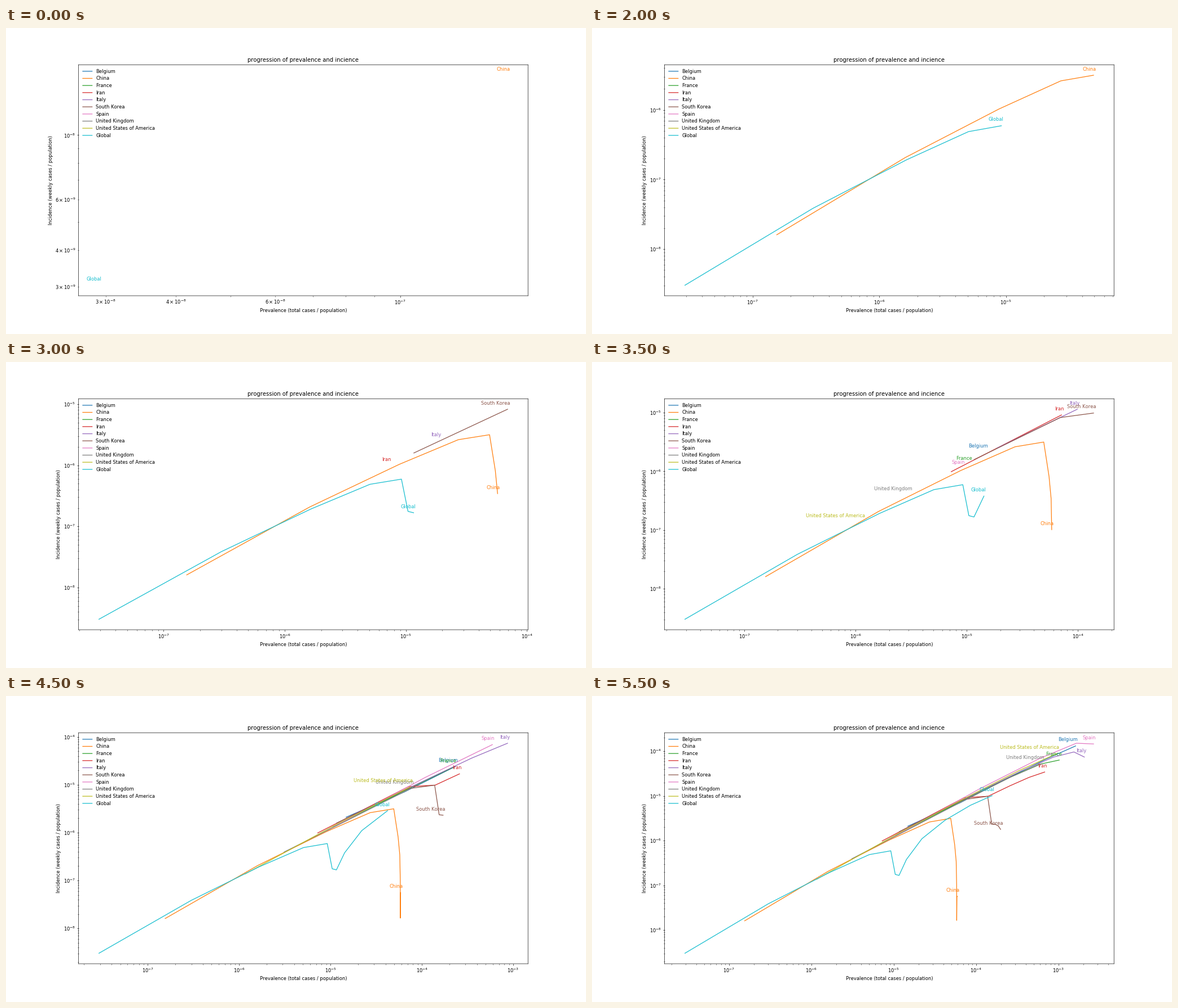
A matplotlib script that plays this animation: 1028 px wide and 544 px high, repeating every 10000 ms.

```python
import matplotlib.pyplot as plt
import numpy as np
from matplotlib.animation import FuncAnimation

W, H, DPI = 1028, 544, 60
WEEKS, STEP_MS, LOOP_MS = 12, 500, 10000

plt.rcParams["text.kerning_factor"] = 6
plt.rcParams["path.snap"] = False


def outbreak(before, *stages):
    """Weekly totals; each stage (weeks, end total, fade) eases the log total,
    its growth rate dying out one week after the stage is over."""
    logs = [np.log(before)]
    for weeks, end, fade in stages:
        left = 1 - np.arange(1, weeks + 1) / (weeks + 1)
        ease = (1 - left ** fade) / (1 - left[-1] ** fade)
        logs.extend(logs[-1] + (np.log(end) - logs[-1]) * ease)
    return np.exp(logs)


china = outbreak(59, (1, 216, 1), (4, 68600, 2.25), (4, 81050, 4.8), (3, 82700, 1))
elsewhere = outbreak(0.8, (6, 1770, 1), (6, 1.092e6, 1.5))

# name: (population in millions, weekly totals)
REGIONS = {
    "Belgium": (11.4, outbreak(1, (1, 169, 1), (4, 18430, 1.5))),
    "China": (1393, china),
    "France": (67, outbreak(100, (1, 716, 1), (4, 68600, 2))),
    "Iran": (81.8, outbreak(28, (1, 593, 1), (1, 5820, 1), (4, 55740, 1.4))),
    "Italy": (60.4, outbreak(79, (1, 1128, 1), (5, 124600, 2.35))),
    "South Korea": (51.6, outbreak(29, (1, 602, 1), (2, 7130, 2.9), (4, 10240, 1.5))),
    "Spain": (46.7, outbreak(66, (1, 430, 1), (4, 124700, 2.5))),
    "United Kingdom": (66.5, outbreak(23, (1, 206, 1), (4, 41900, 1.6))),
    "United States of America": (327, outbreak(66, (1, 380, 1), (4, 312200, 1.7))),
    "Global": (7500, china + elsewhere),
}


class Track:
    """One region's curve with a label riding on its newest point."""

    def __init__(self, ax, name, millions, totals):
        totals = totals / (millions * 1e6)
        self.x = totals[1:]
        self.y = np.diff(totals) / 7
        self.start = WEEKS - len(self.x)
        self.line, = ax.plot([], [], label=name)
        self.tag = ax.annotate(name, (1, 1), xytext=(5, 10), ha="right",
                               textcoords="offset points",
                               color=self.line.get_color())

    def show(self, week):
        n = max(0, week + 1 - self.start)
        self.line.set_data(self.x[:n], self.y[:n])
        self.tag.set_visible(n > 0)
        if n:
            self.tag.xy = self.x[n - 1], self.y[n - 1]


fig, ax = plt.subplots(figsize=(W / DPI, H / DPI), dpi=DPI)
fig.subplots_adjust(left=0.125, right=0.9, bottom=0.125, top=0.88)
ax.set_xscale("log")
ax.set_yscale("log")
ax.set_title("progression of prevalence and incience")
ax.set_xlabel("Prevalence (total cases / population)")
ax.set_ylabel("Incidence (weekly cases / population)")

tracks = [Track(ax, name, *data) for name, data in REGIONS.items()]
ax.legend(loc="upper left", frameon=False, labelspacing=0.44)


def update(frame):
    week = min(frame, WEEKS - 1)
    for track in tracks:
        track.show(week)
    ax.relim()
    ax.autoscale_view()
    return []


def init():
    return update(0)


anim = FuncAnimation(fig, update, frames=LOOP_MS // STEP_MS, init_func=init,
                     interval=STEP_MS, repeat=True, repeat_delay=0, blit=False)
plt.show()
```
